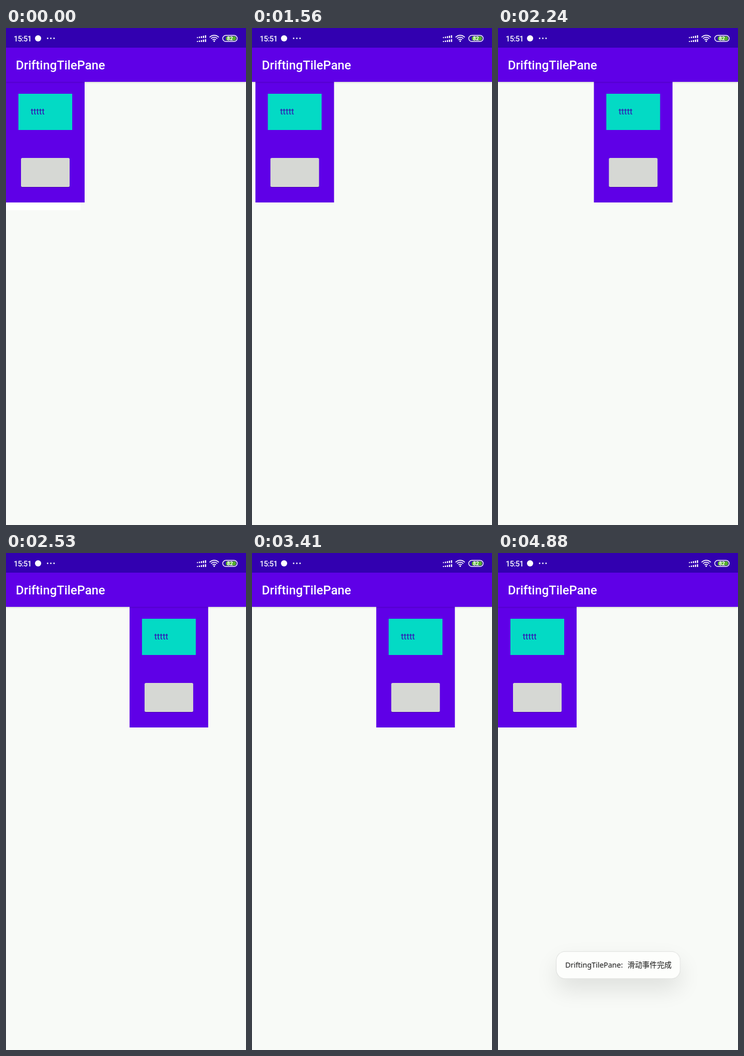
Animation, 464 px wide and 960 px high, one loop 4.96 s. Source, as an HTML page:

```html
<!DOCTYPE html>
<html lang="en">
<head>
<meta charset="utf-8">
<title>Sliding panel</title>
<style>
  html, body { margin: 0; width: 100%; height: 100%; overflow: hidden; background: #f8faf7; }
  #stage { position: absolute; left: 0; top: 0; width: 464px; height: 960px; overflow: hidden; background: #f8faf7; }
  #stage div, #stage svg { position: absolute; }
  #strip { left: 0; top: 337px; width: 144px; height: 15px; background: #fff; }
  #panel { left: 0; top: 104px; width: 151.5px; height: 233px; background: #5f00e7; }
  #card { left: 23.7px; top: 23px; width: 104px; height: 70px; background: #03dac5;
    font: 16.5px/70px Roboto, sans-serif; color: #3700b3; text-indent: 24px; }
  #button { left: 28.7px; top: 147px; width: 94.3px; height: 55.5px; border-radius: 2.5px;
    background: #d6d8d4; box-shadow: 0 1px 1px rgba(0, 0, 0, .25); }
  #bar { left: 0; top: 38px; width: 464px; height: 66px; background: #5f00e7; box-shadow: 0 1px 3px rgba(0, 0, 0, .2); }
  #toast { left: 112.5px; top: 770px; width: 239px; height: 51.5px; border-radius: 17px; background: #fdfefc;
    box-shadow: 0 0 0 .6px rgba(0, 0, 0, .15), 0 20px 44px rgba(0, 0, 0, .11); }
  svg { left: 0; top: 0; overflow: visible; }
</style>
</head>
<body>
<div id="stage">
  <div id="strip"></div>
  <div id="panel">
    <div id="card">ttttt</div>
    <div id="button"></div>
  </div>
  <div id="bar"></div>
  <svg width="464" height="104" fill="#fff" font-family="Roboto, sans-serif">
    <rect width="464" height="38" fill="#3200b0"/>
    <text x="15" y="25.5" font-size="14.5" font-weight="500" letter-spacing="-.5">15:51</text>
    <circle cx="62" cy="20" r="6"/>
    <g id="dots"></g>
    <g id="signal"></g>
    <g id="wifi" fill="none" stroke="#fff" stroke-width="1.8"></g>
    <path id="traffic" d="M408 25l1.2-2 1.2 2zM410 25.5l1.2 2 1.2-2z" opacity=".8"/>
    <rect x="419" y="14.2" width="28" height="11.8" rx="5.9" fill="none" stroke="#fff" stroke-width="1.4"/>
    <rect x="425" y="16" width="19.8" height="8.2" rx="3.5" fill="#55b02c"/>
    <text x="433" y="23.8" font-size="10" font-weight="700" text-anchor="middle">82</text>
    <text x="19" y="80" font-size="23.8" font-weight="500">DriftingTilePane</text>
  </svg>
  <div id="toast">
    <svg width="239" height="52" fill="#111" font-size="14.2">
      <text x="17" y="31" font-family="Noto Sans, sans-serif">DriftingTilePane:</text>
      <text x="137.5" y="31" font-family="Noto Sans CJK SC, Noto Sans CJK, sans-serif" lang="zh-CN">滑动事件完成</text>
    </svg>
  </div>
</div>
<script>
  const LOOP = 4960;
  const $ = id => document.getElementById(id);

  function add(parent, tag, attrs) {
    const el = document.createElementNS('http://www.w3.org/2000/svg', tag);
    for (const key in attrs) el.setAttribute(key, attrs[key]);
    $(parent).append(el);
  }

  for (let i = 0; i < 3; i++) add('dots', 'circle', { cx: 80.5 + i * 6.2, cy: 20, r: 1.4 });

  // Two stacked rows of rising signal bars.
  for (const base of [19.4, 27]) {
    for (let i = 0; i < 5; i++) {
      const height = 1.8 + i * 0.9;
      add('signal', 'rect', { x: 369 + i * 3.9, y: base - height, width: 2.3, height });
    }
  }

  // Wifi fan: concentric arcs around the foot.
  for (const r of [4.4, 8.2, 12]) {
    const dx = r * 0.74, y = 26 - r * 0.67;
    add('wifi', 'path', { d: `M${402.5 - dx} ${y}A${r} ${r} 0 0 1 ${402.5 + dx} ${y}` });
  }
  add('wifi', 'circle', { cx: 402.5, cy: 25.2, r: 1.5, fill: '#fff', stroke: 'none' });

  // Each step: [time in ms, value, easing to the next step].
  function play(id, steps, style) {
    const frames = steps.map(([t, value, easing = 'linear']) =>
      ({ offset: t / LOOP, easing, ...style(value) }));
    $(id).animate(frames, { duration: LOOP, iterations: Infinity });
  }

  const show = opacity => ({ opacity });

  play('panel', [
    [0, 0], [1500, 0], [1560, 6.5], [1660, 17], [1740, 44], [1950, 118.3], [2190, 176],
    [2530, 238.7], [2730, 280], [2970, 318.7], [3150, 340], [3310, 350, 'ease-in-out'],
    [3570, 0], [LOOP, 0]
  ], x => ({ transform: `translateX(${x}px)` }));

  play('toast', [
    [0, [0, 20, .9]], [3540, [0, 20, .9], 'ease-out'], [3720, [1, -1.5, 1.015], 'ease-in-out'],
    [3850, [1, -1, 1.009], 'ease-out'], [4050, [1, 0, 1]], [LOOP, [1, 0, 1]]
  ], ([opacity, y, scale]) => ({ opacity, transform: `translateY(${y}px) scale(${scale})` }));

  play('strip', [[0, 1, 'step-end'], [50, 0], [LOOP, 0]], show);
  play('traffic', [[0, 0, 'step-end'], [4100, 1], [LOOP, 1]], show);
</script>
</body>
</html>
```
